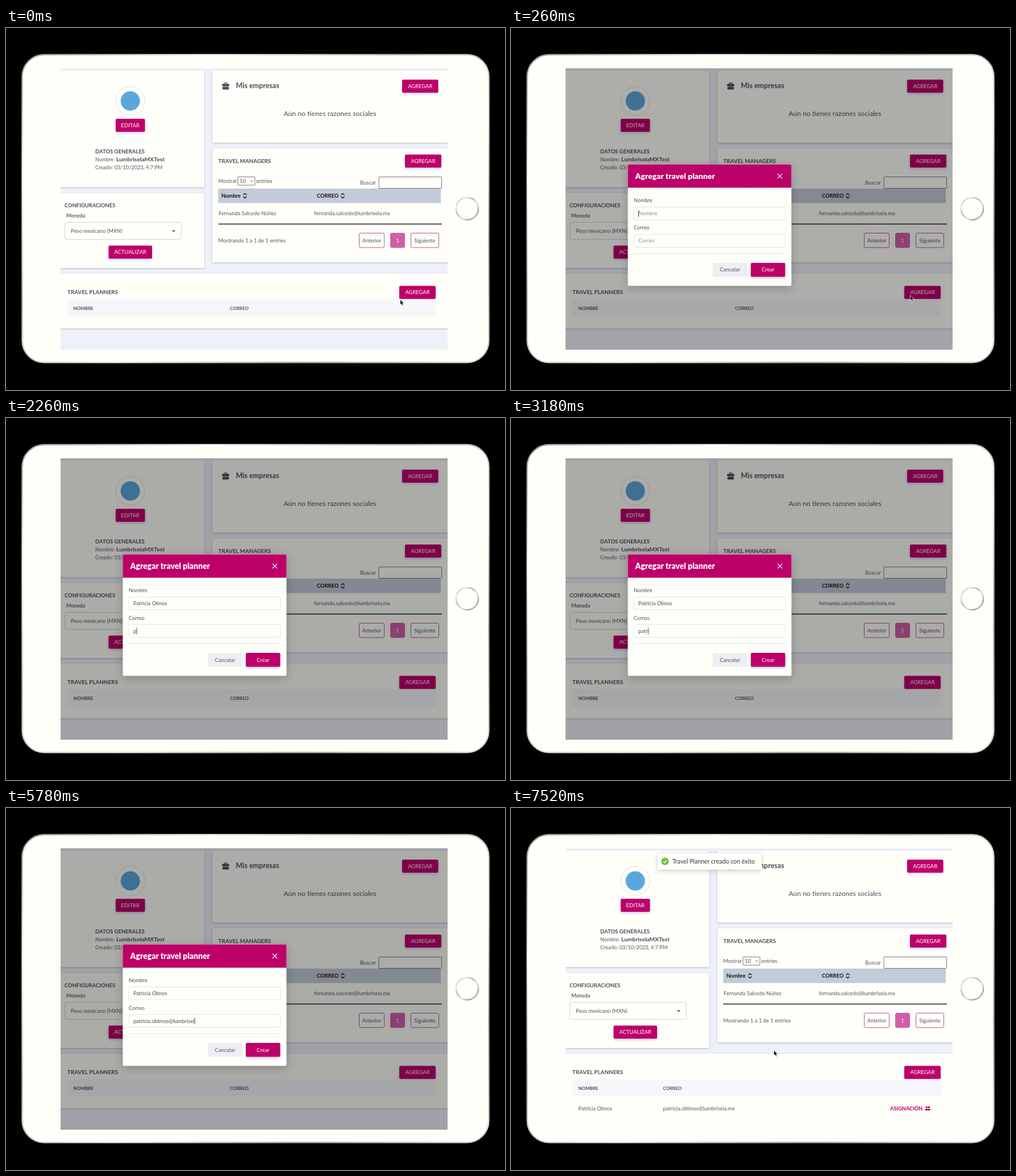
An HTML page for the animation above (7540 ms loop, 878 by 638 pixels).

```html
<!DOCTYPE html>
<html lang="es">
<head>
<meta charset="utf-8">
<title>Agregar travel planner</title>
<style>
html, body { margin: 0; width: 100%; height: 100%; overflow: hidden; background: #000; }
svg { display: block; }
text { font-family: Lato, "Open Sans", sans-serif; font-size: 9.4px; fill: #535762; white-space: pre; }
.card { fill: #fffffa; filter: drop-shadow(0 1.5px 1.5px rgba(30, 35, 60, .28)); }
.btn { fill: #bd0069; filter: drop-shadow(0 2.5px 2.5px rgba(130, 135, 220, .45)); }
</style>
</head>
<body>
<svg id="stage" width="878" height="638" viewBox="0 0 878 638">
  <defs>
    <linearGradient id="metal" x1="0" y1="0" x2="1" y2="1">
      <stop offset="0" stop-color="#9a9a98"/>
      <stop offset=".2" stop-color="#e9e9e7"/>
      <stop offset=".4" stop-color="#b5b5b3"/>
      <stop offset=".6" stop-color="#dededc"/>
      <stop offset=".8" stop-color="#a5a5a3"/>
      <stop offset="1" stop-color="#d6d6d4"/>
    </linearGradient>
    <clipPath id="screenClip"><rect x="96" y="71" width="681" height="496"/></clipPath>
  </defs>
</svg>
<script>
const LOOP = 7540;
const PINK = '#bd0069', PAPER = '#fffffa', DARK = '#4b4f5b', BORDER = '#e1e3e8';
const NAME = 'Patricia Olmos';
const MAIL = 'patricia.oblmos@lumbrisela.mx';
const stage = document.getElementById('stage');

function add(parent, tag, attrs = {}, content) {
  const node = document.createElementNS('http://www.w3.org/2000/svg', tag);
  for (const key in attrs) node.setAttribute(key, attrs[key]);
  if (content !== undefined) node.textContent = content;
  parent.appendChild(node);
  return node;
}
const group = (parent, attrs) => add(parent, 'g', attrs);
const path = (parent, d, attrs) => add(parent, 'path', { d, ...attrs });
const rect = (parent, x, y, width, height, attrs) =>
  add(parent, 'rect', { x, y, width, height, ...attrs });

function label(parent, x, y, content, { size = 9.4, weight = 400, fill = '', anchor = 'start' } = {}) {
  const style = `font-size:${size}px;font-weight:${weight}` + (fill && `;fill:${fill}`);
  return add(parent, 'text', { x, y, style, 'text-anchor': anchor }, content);
}
const heading = (parent, x, y, content, size = 9.7) =>
  label(parent, x, y, content, { size, weight: 700, fill: DARK });
const card = (x, y, w, h) => rect(page, x, y, w, h, { rx: 2, class: 'card' });

function button(parent, x, y, w, h, content) {
  rect(parent, x, y, w, h, { rx: 2, class: 'btn' });
  label(parent, x + w / 2, y + h / 2 + 3.3, content, { fill: '#fff', anchor: 'middle' });
}
function sortIcon(x, y) {
  path(page, `M${x - 3} ${y - 1.3}l3 -2.8 3 2.8M${x - 3} ${y + 1.3}l3 2.8 3 -2.8`,
    { fill: 'none', stroke: '#111', 'stroke-width': 1.3 });
}
function field(y) {
  rect(modal, 216, y, 267, 22.5, { rx: 3, fill: PAPER, stroke: BORDER });
  return label(modal, 224, y + 14.5, '');
}

// Tablet
rect(stage, 28.5, 47, 821, 542.5, { rx: 38.5, fill: PAPER, stroke: 'url(#metal)', 'stroke-width': 2.4 });
add(stage, 'circle', { cx: 811.5, cy: 318.5, r: 19.6, fill: PAPER, stroke: 'url(#metal)', 'stroke-width': 2.6 });

const screen = group(stage, { 'clip-path': 'url(#screenClip)' });
const page = group(screen);
rect(page, 96, 71, 681, 496, { fill: '#eef1f9' });

// Profile
card(90, 75, 259, 205.5);
add(page, 'circle', { cx: 218.7, cy: 128.5, r: 25.5, fill: PAPER, stroke: '#dcdde0' });
add(page, 'circle', { cx: 218.7, cy: 128.5, r: 17, fill: '#5ba7db' });
button(page, 193, 160, 51.5, 23, 'EDITAR');
heading(page, 157, 220.5, 'DATOS GENERALES', 9.5);
label(page, 157, 235, 'Nombre:', { size: 9 });
heading(page, 194, 235, 'LumbriselaMXTest', 10.3);
label(page, 157, 249, 'Creado: 03/10/2023, 4:7 PM', { size: 9.2 });

// Settings
card(90, 291, 259, 132);
heading(page, 103, 315.5, 'CONFIGURACIONES', 9.4);
label(page, 106, 333.5, 'Moneda', { size: 9.2, fill: '#333' });
rect(page, 103.5, 342.5, 205, 30, { rx: 4, fill: PAPER, stroke: '#cfd2d8' });
label(page, 114, 360.5, 'Peso mexicano (MXN)');
path(page, 'M292 356.5h6l-3 3.2z', { fill: DARK });
button(page, 180.5, 383.5, 76.5, 23, 'ACTUALIZAR');

// Companies
card(363, 75, 420, 127);
rect(page, 380, 98.5, 13, 4.2, { rx: 1.8, fill: DARK });
rect(page, 380.7, 103.6, 11.6, 5, { rx: 1.8, fill: DARK });
rect(page, 384, 96.6, 5, 4, { rx: 1.2, fill: 'none', stroke: DARK, 'stroke-width': 1.2 });
heading(page, 404.5, 106, 'Mis empresas', 12.5);
button(page, 697, 91, 63.5, 23, 'AGREGAR');
label(page, 570, 154.5, 'Aún no tienes razones sociales', { size: 12.2, fill: DARK, anchor: 'middle' });

// Managers
card(363, 212, 420, 201);
heading(page, 373.5, 238, 'TRAVEL MANAGERS', 9.8);
button(page, 702, 223, 64, 23, 'AGREGAR');
label(page, 373.5, 273, 'Mostrar');
rect(page, 408, 262.5, 30, 14.5, { rx: 1, fill: PAPER, stroke: '#777' });
label(page, 411, 273, '10');
path(page, 'M429.5 268.5l2.5 2.6 2.5 -2.6', { fill: 'none', stroke: '#666' });
label(page, 440.5, 273, 'entries');
label(page, 623, 275.5, 'Buscar');
rect(page, 656, 262.5, 110.5, 20, { rx: 1, fill: PAPER, stroke: '#777' });
rect(page, 373.5, 283, 391.5, 25.5, { fill: '#c3cad8' });
label(page, 379, 299, 'Nombre', { size: 9.3, weight: 700, fill: '#111' });
label(page, 547, 299, 'CORREO', { size: 9.3, weight: 700, fill: '#111' });
sortIcon(420.5, 295.7);
sortIcon(592.5, 295.7);
label(page, 374, 330, 'Fernanda Salcedo Núñez');
label(page, 542, 330, 'fernanda.salcedo@lumbrisela.mx');
rect(page, 373.5, 344.7, 393.5, 1.6, { fill: '#2b2b33' });
label(page, 373.5, 377.5, 'Mostrando 1 a 1 de 1 entries');
for (const [x, w, content, active] of [
  [621.5, 44, 'Anterior'], [676.5, 25, '1', true], [712.5, 49, 'Siguiente'],
]) {
  rect(page, x, 361.5, w, 25.5, { rx: 2.5, fill: active ? '#d15fa8' : PAPER, stroke: active ? '#d15fa8' : '#b0578c' });
  label(page, x + w / 2, 377.5, content, { size: 9.2, fill: active ? '#fff' : '', anchor: 'middle' });
}

// Planners
const plannersCard = card(90, 433, 693, 96.5);
heading(page, 108, 469, 'TRAVEL PLANNERS', 9.9);
button(page, 692, 454.5, 64, 23, 'AGREGAR');
rect(page, 108, 478, 648, 31, { fill: '#f6f7fa' });
heading(page, 118.5, 496.5, 'NOMBRE', 8);
const mailHeading = heading(page, 394, 496.5, 'CORREO', 8);
const newRow = group(page);
label(newRow, 118.5, 533, NAME);
label(newRow, 267.5, 533, MAIL);
label(newRow, 667, 533, 'ASIGNACIÓN', { weight: 700, size: 9.2, fill: PINK });
for (const x of [731.3, 735.3]) {
  add(newRow, 'circle', { cx: x, cy: 527.4, r: 1.8, fill: PINK });
  path(newRow, `M${x - 2.8} 533v-1.4q0 -1.6 2.8 -1.6t2.8 1.6v1.4z`, { fill: PINK });
}

// Dialog
const backdrop = rect(screen, 96, 71, 681, 496);
const modal = group(screen);
rect(modal, 205.5, 240.5, 288, 214, { rx: 2, fill: PAPER, style: 'filter:drop-shadow(0 4px 8px rgba(0,0,0,.22))' });
path(modal, 'M205.5 281.5v-39q0 -2 2 -2h284q2 0 2 2v39z', { fill: PINK });
label(modal, 218.5, 265.5, 'Agregar travel planner', { size: 14, weight: 900, fill: '#fff' });
path(modal, 'M469 257l8 8m0 -8l-8 8', { stroke: '#fff', 'stroke-width': 1.2 });
label(modal, 216, 306.5, 'Nombre', { size: 9.1, fill: DARK });
label(modal, 216, 355.5, 'Correo', { size: 9.1, fill: DARK });
const nameField = field(315.5);
const mailField = field(364);
const caret = rect(modal, 0, 0, 0.8, 12, { fill: '#333' });
rect(modal, 216, 397, 267, 1, { fill: '#e3e4e8' });
rect(modal, 355, 414, 61, 24.5, { rx: 1.5, fill: '#edeff3' });
label(modal, 385.5, 429.5, 'Cancelar', { anchor: 'middle' });
button(modal, 422, 414, 60.5, 24.5, 'Crear');

// Toast
const toast = group(screen);
rect(toast, 258, 79.5, 183, 29, { rx: 3, fill: PAPER, style: 'filter:drop-shadow(0 2px 4px rgba(0,0,0,.2))' });
add(toast, 'circle', { cx: 271, cy: 94, r: 6.6, fill: '#6cbf3f' });
path(toast, 'M268 94.2l2.2 2.2 4 -4.4', { fill: 'none', stroke: '#fff', 'stroke-width': 1.5 });
label(toast, 284, 97.5, 'Travel Planner creado con éxito', { size: 10.6, fill: '#333' });

const pointer = path(stage, 'M0 0v9.6l2.2 -2 1.5 3.5 1.7 -.7 -1.5 -3.4h3z',
  { fill: '#111', stroke: '#fff', 'stroke-width': 0.7 });

// Motion
const progress = (t, from, to) => Math.min(1, Math.max(0, (t - from) / (to - from)));
const easeOut = p => 1 - (1 - p) ** 2;
const easeInOut = p => p * p * (3 - 2 * p);
const show = (node, visible) => node.setAttribute('display', visible ? 'inline' : 'none');

function track(t, keys) {
  let value = keys[0][1];
  for (let i = 1; i < keys.length; i++) {
    const [start, a] = keys[i - 1], [end, b] = keys[i];
    if (t >= start) value = a + (b - a) * progress(t, start, end);
  }
  return value;
}
const NAME_KEYS = [[780, 0], [860, 1], [1880, NAME.length]];
const MAIL_KEYS = [[1980, 0], [2230, 1], [4200, 9], [5760, 25], [6150, MAIL.length]];

function fill(node, value, placeholder) {
  node.textContent = value || placeholder;
  node.style.fill = value ? '#484c57' : '#8d919b';
}

function render(t) {
  const opening = progress(t, 80, 280), closing = progress(t, 6980, 7160);
  const eased = easeOut(opening) * (1 - closing);
  const scale = 0.93 + 0.07 * eased;
  backdrop.setAttribute('opacity', 0.33 * easeInOut(opening) * (1 - closing));
  modal.setAttribute('opacity', eased);
  modal.setAttribute('transform', `translate(349.5 347.5) scale(${scale}) translate(-349.5 -347.5)`);
  show(modal, eased > 0);

  const name = NAME.slice(0, Math.floor(track(t, NAME_KEYS) + 1e-6));
  const mail = MAIL.slice(0, Math.floor(track(t, MAIL_KEYS) + 1e-6));
  fill(nameField, name, 'Nombre');
  fill(mailField, mail, 'Correo');
  const inMail = t > 1980;
  const typed = inMail ? mail : name;
  const active = inMail ? mailField : nameField;
  caret.setAttribute('x', 224 + (typed && eased > 0 ? active.getComputedTextLength() + 0.3 : 0));
  caret.setAttribute('y', inMail ? 369.5 : 321);
  show(caret, t < 6150 || (t - 6150) % 1000 < 500);

  const created = t >= 7180;
  plannersCard.setAttribute('height', created ? 150 : 96.5);
  mailHeading.setAttribute('x', created ? 267.5 : 394);
  show(newRow, created);
  const pop = easeOut(progress(t, 7180, 7400));
  toast.setAttribute('opacity', pop);
  toast.setAttribute('transform', `translate(0 ${-20 * (1 - pop)})`);

  const arrive = easeOut(progress(t, 0, 160)), back = easeInOut(progress(t, 6350, 6800));
  const x = 693.5 + 9 * arrive - 240 * back, y = 478.5 - 7.5 * arrive - 44 * back;
  pointer.setAttribute('transform', `translate(${x} ${y})`);
  show(pointer, t < 850 || t > 6350);
}

const begin = performance.now();
function tick() {
  render((performance.now() - begin) % LOOP);
  requestAnimationFrame(tick);
}
tick();
</script>
</body>
</html>
```
